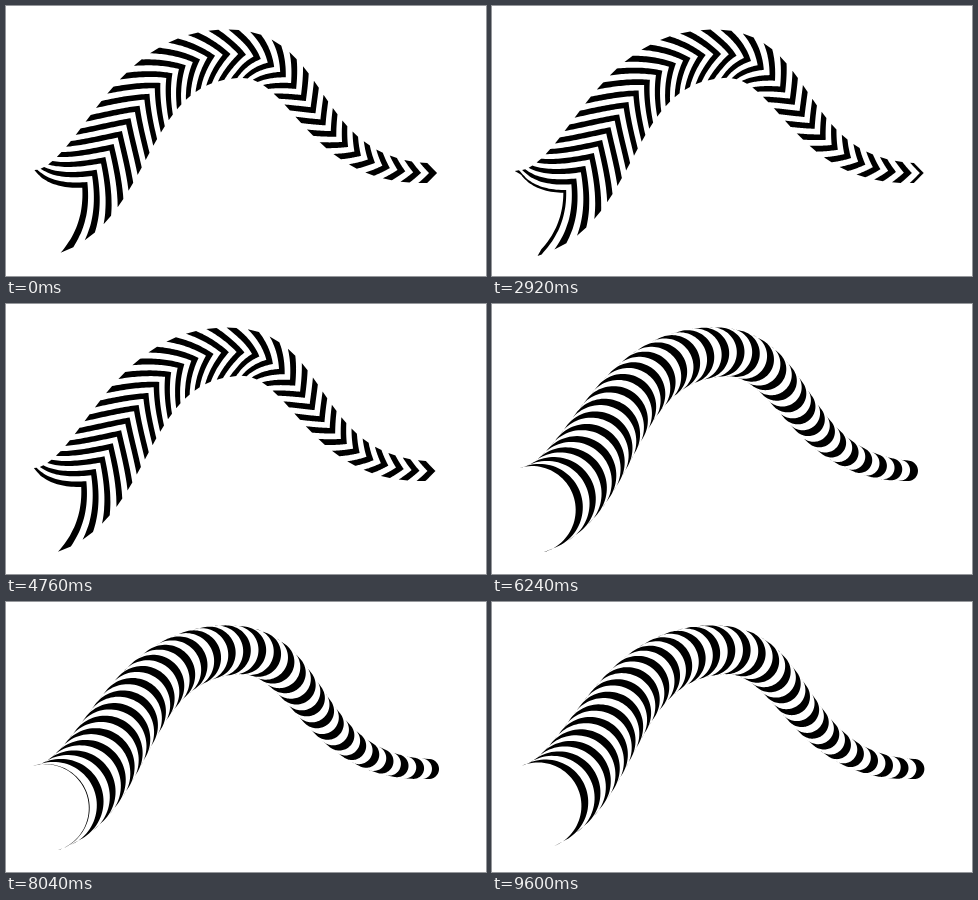
Animation of 480x270 px, one loop 9.64 s. Source, as an HTML page with a canvas:

```html
<!DOCTYPE html>
<html lang="en">
<head>
<meta charset="utf-8">
<title>Striped tube</title>
<style>
  html, body { margin: 0; height: 100%; overflow: hidden; background: #fff; }
  canvas { display: block; width: 480px; height: 270px; }
</style>
</head>
<body>
<canvas id="stage" width="480" height="270"></canvas>
<script>
const ctx = document.getElementById('stage').getContext('2d');
const LOOP = 9640, SWITCH = 4800, PERIOD = 400, FRAME = 40;
const STRIPES = 30, SHIFT = -0.04;

// Spine: two joined cubic curves, sampled for arc length.
const curves = [
  [[38.8, 206.2], [111.5, 187], [117, 48], [230, 48]],
  [[230, 48], [305, 48], [303, 167], [423, 167]],
];
const cubic = (c, t, i) => {
  const u = 1 - t;
  return u * u * u * c[0][i] + 3 * u * u * t * c[1][i] + 3 * u * t * t * c[2][i] + t * t * t * c[3][i];
};
const spine = [];
let length = 0;
for (const c of curves) {
  for (let i = spine.length ? 1 : 0; i <= 400; i++) {
    const x = cubic(c, i / 400, 0), y = cubic(c, i / 400, 1);
    const last = spine[spine.length - 1];
    if (last) length += Math.hypot(x - last.x, y - last.y);
    spine.push({ x, y, s: length });
  }
}

// Point and unit tangent at distance s, continued straight past both ends.
function along(s) {
  let lo = 0, hi = spine.length - 1;
  while (hi - lo > 1) {
    const mid = (lo + hi) >> 1;
    if (spine[mid].s <= s) lo = mid; else hi = mid;
  }
  const a = spine[lo], b = spine[hi], d = b.s - a.s;
  const tx = (b.x - a.x) / d, ty = (b.y - a.y) / d;
  return { x: a.x + tx * (s - a.s), y: a.y + ty * (s - a.s), tx, ty };
}

const radius = s => 10 + 34 * Math.pow(1 - s / length, 1.17);

function place(s, forward, side) {
  const p = along(s);
  return [p.x + p.tx * forward + p.ty * side, p.y + p.ty * forward - p.tx * side];
}

// Leading edge of a stripe, v running from -1 to 1 across the tube.
function chevron(s, v) {
  const r = radius(s);
  return place(s + r * (0.87 - 0.98 * Math.abs(v)), 0, r * v);
}
function arc(s, v) {
  const r = radius(s), angle = v * Math.PI / 2;
  return place(s, r * Math.cos(angle), r * Math.sin(angle));
}

function edge(shape, s, direction) {
  for (let i = -24; i <= 24; i++) ctx.lineTo(...shape(s, direction * i / 24));
}

const clamp = s => Math.max(0, Math.min(length, s));

function draw(time) {
  const t = Math.floor(time % LOOP / FRAME) * FRAME;
  const shape = t < SWITCH ? chevron : arc;
  const step = length / STRIPES;
  const phase = t % PERIOD / PERIOD + SHIFT;
  ctx.fillStyle = '#fff';
  ctx.fillRect(0, 0, 480, 270);
  ctx.fillStyle = '#000';
  for (let k = 0; k <= STRIPES + 1; k++) {
    const front = (k + phase) * step;
    const a = clamp(front), b = clamp(front - step / 2);
    if (a <= b) continue;
    ctx.beginPath();
    edge(shape, a, 1);
    edge(shape, b, -1);
    ctx.fill();
  }
}

const start = performance.now();
function tick() {
  draw(performance.now() - start);
  requestAnimationFrame(tick);
}
tick();
</script>
</body>
</html>
```
